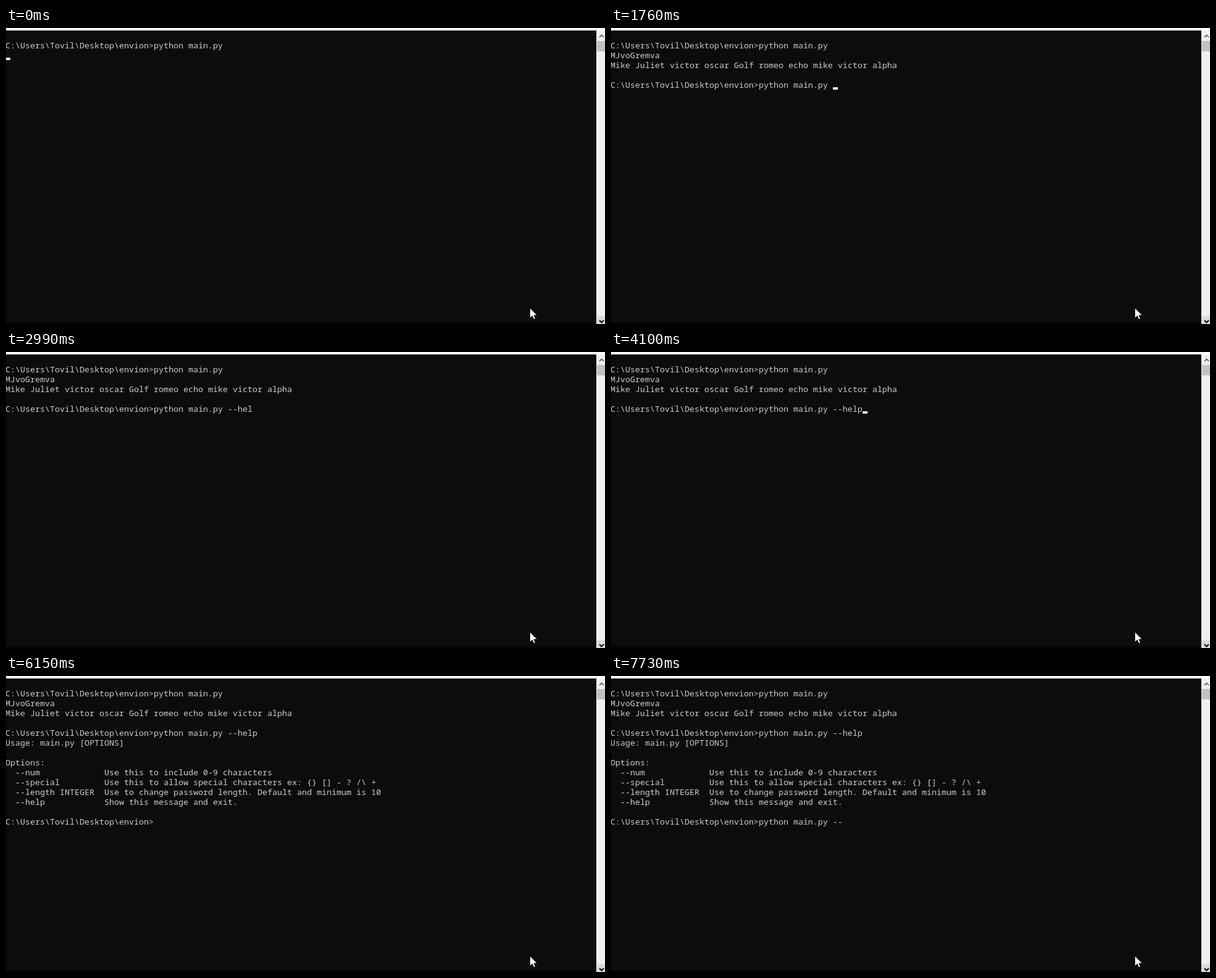
Recreate the animation shown at these times as an HTML page. Size 969 px wide and 480 px high, loop 8000 ms.

```html
<!DOCTYPE html>
<html lang="en">
<head>
<meta charset="utf-8">
<title>Terminal session</title>
<style>
  html, body { margin: 0; width: 100%; height: 100%; overflow: hidden; background: #0c0c0c; }
  svg { display: block; width: 969px; height: 480px; }
  text { font: 13.333px "Noto Sans Mono", "DejaVu Sans Mono", monospace; fill: #ccc; white-space: pre; }
</style>
</head>
<body>
<svg viewBox="0 0 969 480">
  <rect width="969" height="480" fill="#0c0c0c"/>
  <rect y="477" width="955" height="3" fill="#080405"/>
  <g id="rows"></g>
  <rect id="caret" width="8" height="4" fill="#f2f2f2"/>
  <rect width="969" height="4" fill="#fff"/>
  <g id="scrollbar">
    <rect x="955" y="4" width="14" height="476" fill="#f0f0f0"/>
    <rect x="956" y="21" width="13" height="17" fill="#c1c1c1"/>
    <rect x="956" y="467" width="13" height="13" fill="#dadada"/>
    <path d="M960 15l3.5-3.5 3.5 3.5" fill="none" stroke="#555" stroke-width="1.6"/>
    <path d="M960 474l3.5 3.5 3.5-3.5" fill="none" stroke="#000" stroke-width="2"/>
  </g>
  <path id="pointer" d="M847.5 454v16.5l3.8-3.6 2.5 5.6 2.6-1.1-2.4-5.5h5.3z" fill="#fff" stroke="#000" stroke-width=".8"/>
</svg>
<script>
const LOOP = 8000, CELL = 8, LINE = 16, LEFT = -1, BASE = 33;
const PROMPT = "C:\\Users\\Tovil\\Desktop\\envion>";
const RUN = "python main.py";
const option = (flag, info) => ("  " + flag).padEnd(20) + info;

const start = [PROMPT + RUN];
const first = [...start, "MJvoGremva",
  "Mike Juliet victor oscar Golf romeo echo mike victor alpha", "", PROMPT];
const asked = [...first.slice(0, -1), PROMPT + RUN + " --help"];
const helped = [...asked,
  "Usage: main.py [OPTIONS]", "", "Options:",
  option("--num", "Use this to include 0-9 characters"),
  option("--special", "Use this to allow special characters ex: {} [] - ? /\\ +"),
  option("--length INTEGER", "Use to change password length. Default and minimum is 10"),
  option("--help", "Show this message and exit."),
  "", PROMPT];

// [time, screen lines, typed after the last line, caret shown]
const steps = [
  [0, [...start, ""], "", 1],
  [50, first, "", 1],
  [880, first, "", 0],
  [1080, first, RUN, 1],
  [1410, first, RUN, 0],
  [1760, first, RUN + " ", 1],
  [1910, first, RUN + " -", 1],
  [1940, first, RUN + " -", 0],
  [2140, first, RUN + " --", 1],
  [2470, first, RUN + " --", 0],
  [2710, first, RUN + " --h", 1],
  [2810, first, RUN + " --he", 1],
  [2990, first, RUN + " --hel", 0],
  [3280, first, RUN + " --help", 1],
  [3510, first, RUN + " --help", 0],
  [4020, first, RUN + " --help", 1],
  [4110, [...asked, ""], "", 1],
  [4200, helped, "", 1],
  [5100, helped, "", 0],
  [5640, helped, "", 1],
  [6150, helped, "", 0],
  [6200, helped, RUN + " --help", 1],
  [6660, helped, RUN + " --help", 0],
  [6790, helped, RUN + " --hel", 1],
  [6990, helped, RUN + " --he", 1],
  [7170, helped, RUN + " --h", 0],
  [7580, helped, RUN + " --", 1],
  [7730, helped, RUN + " --", 0]
];

const caret = document.getElementById("caret");
const group = document.getElementById("rows");
const rows = helped.map((_, i) => {
  const row = document.createElementNS("http://www.w3.org/2000/svg", "text");
  row.setAttribute("x", LEFT);
  row.setAttribute("y", BASE + i * LINE);
  return group.appendChild(row);
});

let shown;
function draw(time) {
  const step = steps.findLast(s => s[0] <= time);
  if (step === shown) return;
  shown = step;
  const [, lines, typed, caretOn] = step;
  const last = lines.length - 1;
  const current = lines[last] + typed;
  rows.forEach((row, i) => {
    row.textContent = i === last ? current : lines[i] || "";
  });
  caret.setAttribute("x", LEFT + current.length * CELL);
  caret.setAttribute("y", BASE - 1 + last * LINE);
  caret.setAttribute("visibility", caretOn ? "visible" : "hidden");
}

const origin = performance.now();
function tick() {
  draw((performance.now() - origin) % LOOP);
  requestAnimationFrame(tick);
}
tick();
</script>
</body>
</html>
```
